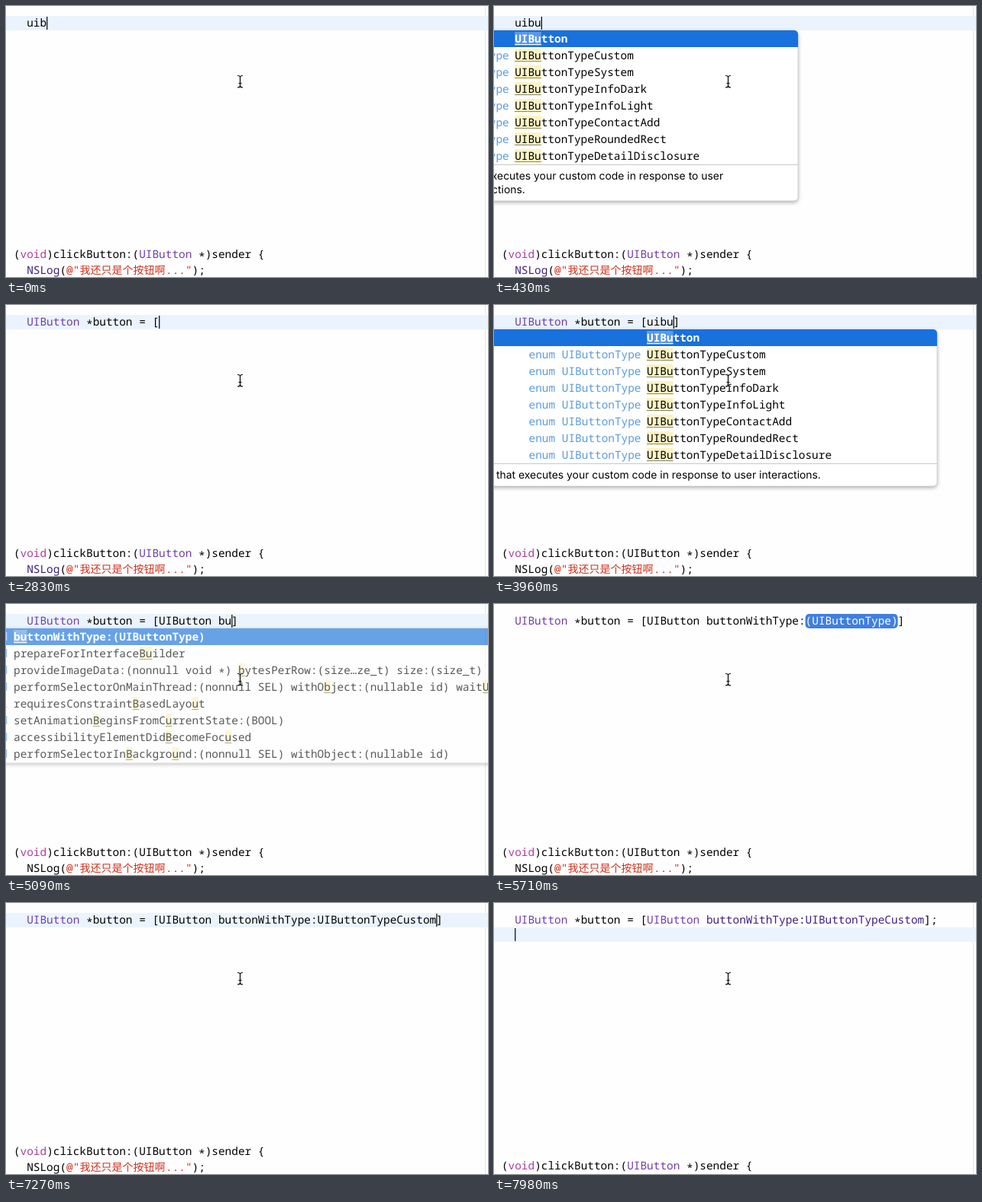
Animation, 631 px wide and 356 px high, one loop 8 s. Source, as an HTML page:

```html
<!DOCTYPE html>
<html>
<head>
<meta charset="utf-8">
<style>
html, body { margin: 0; width: 100%; height: 100%; overflow: hidden; background: #fefefe; }
svg { display: block; }
text { white-space: pre; text-rendering: geometricPrecision; font: 14.41px "Noto Sans Mono", monospace; }
.bold { font-weight: 600; }
.cjk { font: 14px "Noto Sans CJK SC", "Noto Sans CJK", sans-serif; }
.ui { font: 13.9px Inter, sans-serif; }
.icon { font: 500 13px Inter, sans-serif; text-anchor: middle; }
.big { font-size: 19px; font-weight: 600; }
.end { text-anchor: end; }
.shadow { filter: drop-shadow(0 2px 2.5px rgba(0, 0, 0, .3)); }
</style>
</head>
<body>
<svg id="stage" width="631" height="356" viewBox="0 0 631 356"></svg>
<script>
const LOOP = 8000, ADV = 8.646, LEFT = 27.2;
const BLACK = '#000', TYPE = '#703daa', CALL = '#3e1e81', KEY = '#ad3da4', STR = '#d12f1b', BLUE = '#1871dc';

const rect = (x, y, w, h, fill, more = '') =>
  `<rect x="${x}" y="${y}" width="${w}" height="${h}" fill="${fill}" ${more}/>`;

// The asterisk sits at mid height
const text = (x, y, s, fill = BLACK, cls = '') =>
  `<text x="${x}" y="${y}" fill="${fill}" class="${cls}">` +
  s.replace(/\*(.?)/g, '<tspan dy="2.5">*</tspan><tspan dy="-2.5">$1</tspan>') + '</text>';

// A tilde marks the next letter as matched
const kinds = ['Custom', 'System', 'InfoDark', 'InfoLight', 'ContactAdd', 'RoundedRect', 'DetailDisclosure']
  .map(k => ['enum UIButtonType', '~U~I~B~uttonType' + k]);
const classRows = [['', '~U~I~B~utton'], ...kinds];

const lists = {
  first: { l: -200, r: 398, x: LEFT, rows: classRows,
    note: [[-40, 'that executes your custom code in response to user'], [-40, 'interactions.']] },
  cls: { l: -70, r: 580, x: 200, rows: classRows,
    note: [[3, 'that executes your custom code in response to user interactions.']] },
  method: { l: -149, r: 700, x: 10, note: [[-130, 'Creates and returns a new button of the specified type.']], rows: [
    ['id', '~b~uttonWithType:(UIButtonType)'],
    ['void', 'prepareForInterface~B~uilder'],
    ['void', 'provideImageData:(nonnull void *) ~bytesPerRow:(size…ze_t) size:(size_t)'],
    ['void', 'performSelectorOnMainThread:(nonnull SEL) withO~bject:(nullable id) wait~UntilDone:(BOOL)'],
    ['BOOL', 'requiresConstraint~BasedLayo~ut'],
    ['void', 'setAnimation~BeginsFromC~urrentState:(BOOL)'],
    ['void', 'accessibilityElementDid~BecomeFoc~used'],
    ['void', 'performSelectorIn~Backgro~und:(nonnull SEL) withObject:(nullable id)']] },
  value: { l: 7, r: 700, x: 407, icons: true, rows: [...kinds,
    ['enum UIDocumentBrowserUserInterfaceStyle', '~U~IDocument~Browser~UserInterfaceStyle']] }
};

// [start, line with | as caret, list, opacity, note shown]
const A = 'UIButton *button = [', B = A + 'UIButton ', C = B + 'buttonWithType:', D = C + 'UIButtonTypeCustom';
const states = [
  [0, 'uib|'], [90, 'uibu|'], [200, 'uibu|', 'first', .65], [310, 'uibu|', 'first', 1],
  [430, 'uibu|', 'first', 1, 1], [670, 'uibu', 'first', 1, 1], [740, 'UIButton|', 'first', .4, 1], [820, 'UIButton|'],
  ...[900, 1170, 1350, 1400, 1580, 1760, 1820, 2000, 2480, 2600, 2710, 2830]
    .map((t, i) => [t, A.slice(0, 9 + i) + '|']),
  [3190, A + 'u|]'], [3280, A + 'ui|]'], [3510, A + 'uib|]'],
  [3600, A + 'uibu|]', 'cls', 1], [3960, A + 'uibu|]', 'cls', 1, 1],
  [4170, A + 'UIButton|]'], [4350, B + '|]'], [4520, B + 'b|]'], [4580, B + 'bu|]'],
  [5090, B + 'bu|]', 'method', .65], [5180, B + 'bu]', 'method', 1], [5390, B + 'bu]', 'method', 1, 1],
  [5710, C + '(UIButtonType)]'],
  [6180, C + 'u|]'], [6270, C + 'ui|]'], [6380, C + 'uib|]'], [6470, C + 'uibu|]'],
  [6740, C + 'uibu|]', 'value', 1], [7030, C + 'uibu]', 'value', 1],
  [7270, D + '|]'], [7510, D + ']|'], [7890, D + '];|'], [7980, D + '];']
];

function codeLine(line, t, done) {
  const caret = line.indexOf('|');
  let out = '', col = 0;
  for (const word of line.replace('|', '').match(/\w+|\W+/g)) {
    let fill = BLACK;
    if (word === 'UIButton' && (done || (!col && t >= 2060))) fill = TYPE;
    else if (done && /With|Custom/.test(word)) fill = CALL;
    const x = LEFT + col * ADV;
    if (word === 'UIButtonType') fill = '#fff';
    if (word === ':(') {
      out += rect(x + ADV, 13, 14 * ADV, 19, '#3f7fe0', 'rx="5"') +
        text(x, 27, ':') + text(x + ADV, 27, '(', '#fff');
    } else if (word === ')]') out += text(x, 27, ')', '#fff') + text(x + ADV, 27, ']');
    else out += text(x, 27, word, fill);
    col += word.length;
  }
  return out + (caret < 0 ? '' : rect(LEFT + caret * ADV, 14, 1.2, 17, BLACK));
}

function lowerCode(plain, dy) {
  const row = (y, parts) => parts.map(([col, s, fill]) => text(LEFT + (col - 4) * ADV, y + dy, s, fill)).join('');
  return row(293, [[0, '}']]) +
    row(331, [[0, '- ('], [3, 'void', KEY], [7, ')clickButton:('],
      [21, 'UIButton', plain ? BLACK : TYPE], [29, ' *)sender {']]) +
    row(352, [[4, 'NSLog', plain ? BLACK : CALL], [9, '('], [10, '@"', STR]]) +
    text(96.6, 352 + dy, '我还只是个按钮啊', STR, 'cjk') +
    text(209, 352 + dy, '..."', STR) + text(209 + 4 * ADV, 352 + dy, ');');
}

function popup({ l, r, x, rows, note, icons }, opacity, noted) {
  const w = r - l, bottom = noted ? 220 + 18 * note.length : 209;
  let out = rect(l, 32, w, bottom - 32, '#fff', 'rx="5" class="shadow" stroke="#c4c4c4" stroke-width=".6"') +
    rect(l, 32, w, 22, BLUE, 'rx="5"') + rect(l, 44, w, 10, BLUE);
  rows.forEach(([type, name], i) => {
    const y = 48 + 22 * i, sel = !i;
    let col = 0;
    for (let k = 0; k < name.length; k++) {
      if (name[k] !== '~') { col++; continue; }
      const mx = x + col * ADV;
      out += rect(mx, y - 14, ADV, 18, sel ? '#5b9ae8' : '#fbf3c2') +
        rect(mx, y + 2, ADV, 1, sel ? '#fff' : '#8a8a70');
    }
    out += text(x - 7.5, y, type, sel ? '#a9cdf5' : '#5a9be0', 'end') +
      text(x, y, name.replace(/~/g, ''), sel ? '#fff' : BLACK, sel ? 'bold' : '');
    if (icons) out += rect(17.5, y - 12.5, 16, 16, '#7bae8c', 'stroke="#5f9673"') +
      text(25.5, y, 'K', '#fff', 'icon');
  });
  if (noted) {
    out += rect(l, 208, w, 1, '#c8c8c8');
    note.forEach(([nx, s], i) => out += text(nx, 228 + 18 * i, s, BLACK, 'ui'));
  }
  return `<g opacity="${opacity}">${out}</g>`;
}

function pointer(arrow) {
  if (arrow) return '<path d="M306.5 98.5v14l3.3-3 2.2 5.2 2.2-1-2.2-5h4.4z" stroke="#fff"/>';
  const d = 'M303 91.5q3.5 0 3.5 2v11.5q0 2-3.5 2M310 91.5q-3.5 0-3.5 2v11.5q0 2 3.5 2M304.5 101.5h4';
  return `<path d="${d}" fill="none" stroke="#fff" stroke-width="2.6" opacity=".7"/>` +
    `<path d="${d}" fill="none" stroke="#000" stroke-width="1.2"/>`;
}

function scene(t) {
  const [, line, list, opacity, noted] = states.findLast(s => s[0] <= t);
  const done = t >= 7980, token = line.includes('(');
  let out = rect(0, 0, 631, 356, '#fefefe') + rect(627, 0, 1, 356, '#e4e4e4');
  if (!token) out += rect(0, done ? 32 : 13, 631, 19, '#ebf4fe');
  out += codeLine(line, t, done) + lowerCode(t >= 2950 && !done, done ? 19 : 0);
  if (done) out += rect(LEFT, 33, 1.2, 17, BLACK);
  if (t >= 7510 && t < 7600)
    out += rect(189, 11, 14, 24, '#fdf04a', 'rx="4" class="shadow"') + text(190.3, 29, '[', BLACK, 'big');
  if (list) out += popup(lists[list], opacity, noted);
  return out + pointer(t >= 6940 && t < 7270);
}

const stage = document.getElementById('stage');
let shown = '';
function frame() {
  const next = scene(performance.now() % LOOP);
  if (next !== shown) stage.innerHTML = shown = next;
  requestAnimationFrame(frame);
}
frame();
</script>
</body>
</html>
```
